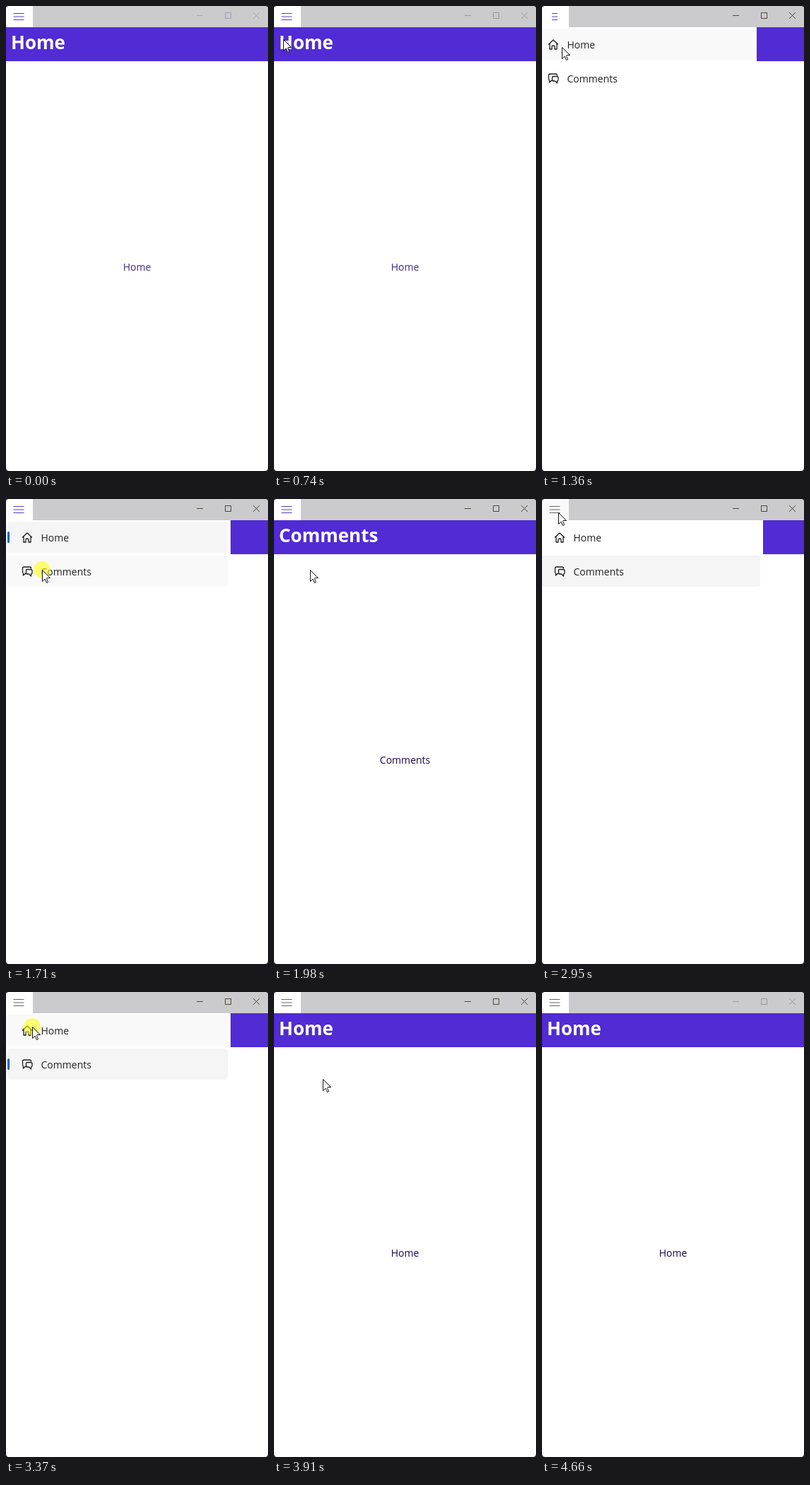
Animation of 371x657 px, one loop 4.73 s. Source, as an HTML page:

```html
<!DOCTYPE html>
<html lang="en">
<head>
<meta charset="utf-8">
<title>Flyout menu</title>
<style>
  html, body { margin: 0; width: 100%; height: 100%; overflow: hidden; background: #2c2c38; }
  svg { display: block; }
  text { font: 14px "Open Sans", "Noto Sans", sans-serif; }
  #title { font-size: 26px; font-weight: 700; fill: #fff; }
  .line { fill: none; stroke-width: 1; }
  .icon { fill: none; stroke: #1c1c1c; stroke-width: 1.3; stroke-linejoin: round; stroke-linecap: round; }
</style>
</head>
<body>
<svg width="371" height="657" viewBox="0 0 371 657">
  <clipPath id="window"><rect width="371" height="657" rx="4.5"/></clipPath>
  <g clip-path="url(#window)">
    <rect width="371" height="657" fill="#fff"/>
    <rect width="371" height="30" fill="#cbcbcd"/>
    <rect y="30" width="371" height="48" fill="#512bd4"/>
    <text id="title" x="7" y="61"></text>
    <text id="label" x="185.5" y="374" text-anchor="middle"></text>

    <g id="pane">
      <rect y="30" width="318" height="627" fill="#fff"/>
      <rect class="item" x="2" y="32" width="312" height="44" rx="4"/>
      <rect class="item" x="2" y="80" width="312" height="44" rx="4"/>
      <rect id="mark" x="2" width="3" height="16" rx="1.5" fill="#0067c0"/>
      <path class="icon" d="M23.5 54L30 48l6.500 6M25 53v8h3v-4q0-1 2-1t2 1v4h3V53"/>
      <path class="icon" d="M28.500 105.500H27L24.500 108v-3q-1-.5-1-2v-5q0-2 2-2h8q2 0 2 2
        M30 99.500h5q2 0 2 2v3q0 1.500-1.500 1.500v3l-3-3h-2q-2 0-2-2v-3q0-1.500 1.500-1.500z"/>
      <text x="49.5" y="60" fill="#222">Home</text>
      <text x="49.5" y="108" fill="#222">Comments</text>
    </g>

    <rect id="button" width="38" height="30"/>
    <path id="burger" class="line"/>
    <path id="controls" class="line" d="M270 13.500h9M310.500 9.500h8v8h-8zM350 9l9 9M359 9l-9 9"/>
    <circle id="press" r="12" fill="#ff0" fill-opacity=".55"/>
    <path id="cursor" fill="#fff" stroke="#111" d="M.5.5v16l3.500-3.500 2.500 5.500 2-1-2-5 .5-1h4.500z"/>
  </g>
</svg>
<script>
const LOOP = 4730, STEP = 20, PRESS = 100;
const $ = id => document.getElementById(id);
const set = (id, name, value) => $(id).setAttribute(name, value);
const items = document.querySelectorAll('.item');
const pages = ['Home', 'Comments'];

// Times of the press on the menu button and on an item
const visits = [{ open: 1110, pick: 1680 }, { open: 2640, pick: 3340 }];

// Pointer moves: begin, end, x, y
const entry = [275, 650], button = [21, 15], home = [37, 49], comments = [51, 100], exit = [305, 662];
const moves = [
  [60, 740, 13, 47], [870, 1070, ...button], [1220, 1360, 28, 58], [1360, 1570, ...comments],
  [1985, 2470, ...button], [2880, 3170, ...home], [3800, 4260, ...exit]
];

const easeOut = k => 1 - (1 - k) ** 2;
const smooth = k => k * k * (3 - 2 * k);

function pointer(t) {
  let [x, y] = entry;
  moves.forEach(([begin, end, toX, toY], i) => {
    const k = Math.min(1, Math.max(0, (t - begin) / (end - begin)));
    const e = i ? smooth(k) : easeOut(k);
    x += (toX - x) * e;
    y += (toY - y) * e;
  });
  return [Math.round(x), Math.round(y)];
}

function draw(t) {
  const [x, y] = pointer(t);
  const shown = t > moves[0][0];
  const page = visits.filter(v => t >= v.pick + PRESS).length % 2;
  const since = (key, from, to) => visits.some(v => t >= v[key] + from && t < v[key] + to);
  const active = t >= 1070 && t < 4660;

  $('title').textContent = $('label').textContent = pages[page];
  set('label', 'fill', t < 1070 ? '#402a80' : '#190649');
  set('controls', 'stroke', active ? '#4d4738' : t < 620 ? '#a49bbd' : '#999');

  const visit = visits.find(v => t >= v.open + 91 && t < v.pick + PRESS);
  const slide = visit ? 2 ** (-(t - visit.open - 91) / 35) : 1.01;
  set('pane', 'transform', `translate(${-Math.round(318 * slide)})`);
  items.forEach((item, i) => {
    const over = y >= 32 + 48 * i && y < 76 + 48 * i;
    item.setAttribute('fill', over ? '#f9f9f9' : i === page ? '#f5f5f5' : '#fff');
  });
  set('mark', 'y', 46 + 48 * page);

  const [left, width] = since('open', 30, 270) ? [14, 8] : [10.5, 15];
  set('burger', 'd', [10.5, 15, 19.5].map(r => `M${left} ${r}h${width}`).join(''));
  set('burger', 'stroke', t < 2910 ? '#5a3cc8' : '#666');
  set('button', 'fill', x < 38 && y < 30 ? '#f9f9f9' : '#fff');

  const pressed = since('open', 0, PRESS) || since('pick', 0, PRESS);
  set('press', 'visibility', pressed ? 'visible' : 'hidden');
  set('cursor', 'visibility', shown ? 'visible' : 'hidden');
  for (const id of ['press', 'cursor']) set(id, 'transform', `translate(${x} ${y})`);
}

const start = performance.now();
function tick() {
  const t = (performance.now() - start) % LOOP;
  draw(t - t % STEP);
  requestAnimationFrame(tick);
}
tick();
</script>
</body>
</html>
```
